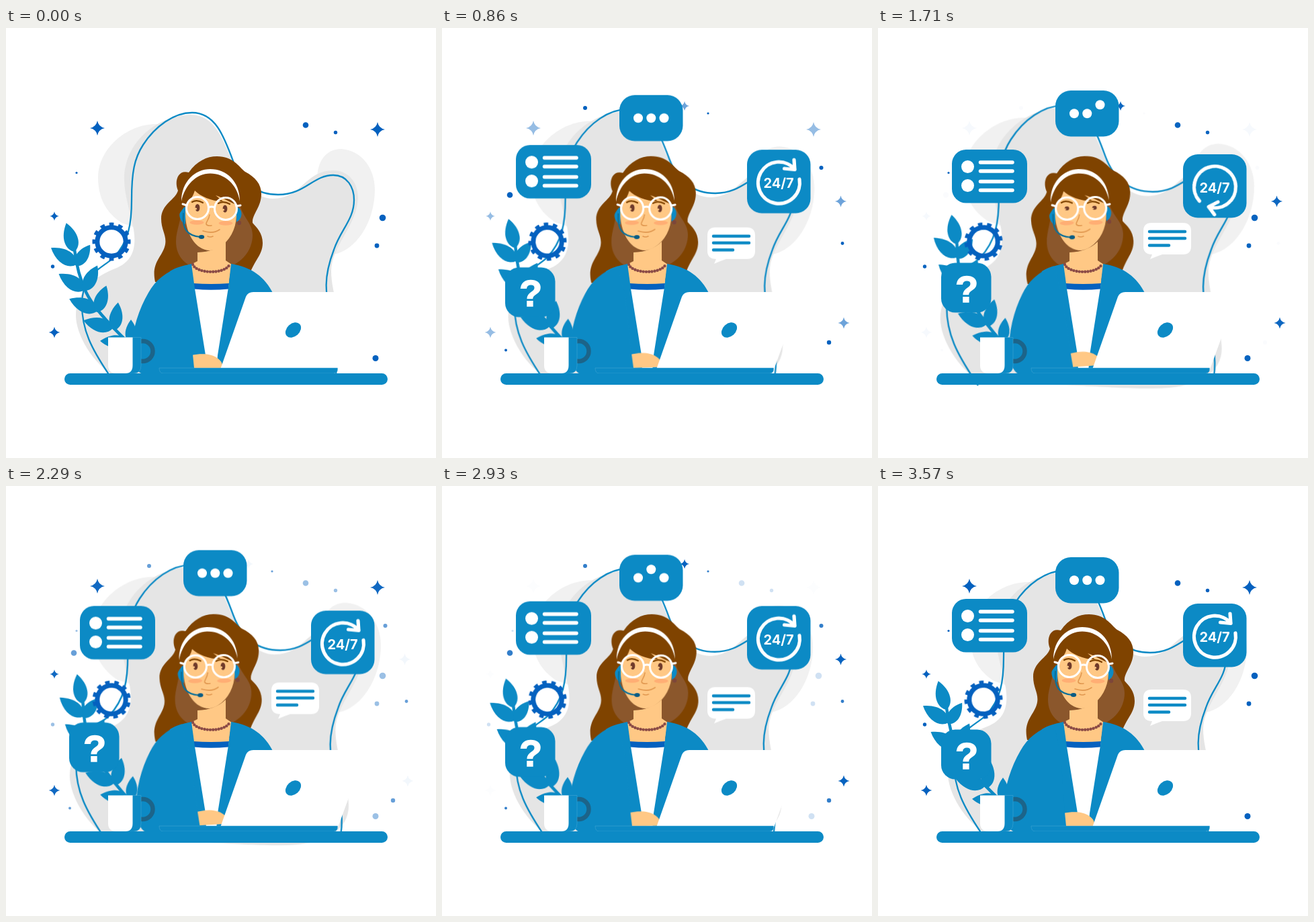
An HTML page without scripts for the animation above (3.64 s loop, 640 by 640 pixels).

```html
<!DOCTYPE html>
<html lang="en">
<head>
<meta charset="utf-8">
<title>Support agent</title>
<style>
html, body { margin: 0; width: 100%; height: 100%; overflow: hidden; background: #fff; }
svg { display: block; width: 100vw; height: 100vh; }
:root { --blue: #0c8ac5; --navy: #0461bf; --hair: #7f4300; --skin: #ffc885; --wave: cubic-bezier(.37, 0, .63, 1); }

.sway, .pop, .star, .dot, .hop, .spin, .wobble, .blink { animation: 3640ms var(--wave) infinite; }
.sway { animation-name: sway; }
.down { --to: translateY(13px); }
.up { --to: translateY(-13px); }
.scene { --to: scale(1.05); transform-origin: 330px 335px; }
.head { --to: rotate(-2.3deg); transform-origin: 302px 362px; }
.arm { --to: rotate(-4deg); transform-origin: 250px 360px; }
.plant { --to: translateY(-3px) rotate(6.3deg); transform-origin: 184px 466px; }
@keyframes sway { 0%, 98.1%, 100% { transform: none } 48.7% { transform: var(--to) } }

.star { animation-name: star; }
.dot { animation-name: dot; }
.star.late { animation-name: star-late; }
.dot.late { animation-name: dot-late; }
@keyframes star { 0%, 32.7%, 65.4%, 98.1%, 100% { opacity: 1 } 16.3%, 49%, 81.7% { opacity: 0 } }
@keyframes star-late { 0%, 32.7%, 65.4%, 98.1%, 100% { opacity: 0 } 16.3%, 49%, 81.7% { opacity: 1 } }
@keyframes dot { 0%, 49%, 98.1%, 100% { opacity: 1 } 24.5%, 73.6% { opacity: 0 } }
@keyframes dot-late { 0%, 49%, 98.1%, 100% { opacity: 0 } 24.5%, 73.6% { opacity: 1 } }

/* speech bubbles grow from one corner, one after another */
.chat { animation-name: pop-chat; transform-origin: 400px 357px; }
.clock { animation-name: pop-clock; transform-origin: 454px 270px; }
.list { animation-name: pop-list; transform-origin: 222px 247px; }
.typing { animation-name: pop-typing; transform-origin: 311px 175px; }
.ask { animation-name: pop-ask; transform-origin: 168px 363px; }
@keyframes pop-chat { 0%, 1.5% { transform: scale(0) } 14%, 100% { transform: none } }
@keyframes pop-clock { 0%, 4% { transform: scale(0) } 17.7%, 100% { transform: none } }
@keyframes pop-list { 0%, 5.8% { transform: scale(0) } 19.5%, 100% { transform: none } }
@keyframes pop-typing { 0%, 6.2% { transform: scale(0) } 19.9%, 100% { transform: none } }
@keyframes pop-ask { 0%, 7.4% { transform: scale(0) } 21.1%, 100% { transform: none } }

.hop { animation-name: hop; }
.hop:nth-of-type(2) { animation-delay: 280ms; }
.hop:nth-of-type(3) { animation-delay: 560ms; }
@keyframes hop { 0%, 27%, 36.2%, 68.7%, 78%, 100% { transform: none } 31.6%, 73.4% { transform: translateY(-13px) } }

.arrow { animation-name: arrow; transform-origin: 501.5px 224px; }
@keyframes arrow { 0%, 36.2% { transform: none } 60.6%, 100% { transform: rotate(360deg) } }
.gear { animation-name: turn; animation-timing-function: linear; transform-origin: 157px 318px; }
@keyframes turn { to { transform: rotate(360deg) } }
.wobble { animation-name: wobble; transform-origin: 132px 400px; }
@keyframes wobble { 0%, 28%, 43%, 100% { transform: none } 33.2% { transform: rotate(8deg) } 38% { transform: rotate(-8deg) } }
.blink { animation-name: blink; transform-origin: 305px 268px; }
@keyframes blink { 0%, 45.5%, 51.5%, 100% { transform: none } 48.5% { transform: scaleY(.1) } }

.line { fill: none; stroke-linecap: round; stroke-linejoin: round; }
text { fill: #fff; text-anchor: middle; }
</style>
</head>
<body>
<svg viewBox="0 0 640 640">
<defs>
  <path id="star" d="M0-11Q1.8-1.8 11 0Q1.8 1.8 0 11Q-1.8 1.8-11 0Q-1.8-1.8 0-11Z"/>
  <path id="leaf" d="M0 0C-12-6-14-24 0-42C14-24 12-6 0 0Z"/>
</defs>

<!-- backdrop -->
<g class="sway scene">
  <g fill="#f1f1f1">
    <path d="M225 143C180 142 137 180 137 222C137 262 157 280 172 290L230 310Z"/>
    <path d="M463 225C463 200 475 180 499 180C530 182 549 210 549 240C549 290 520 332 487 337L480 240Z"/>
  </g>
  <path fill="#e5e5e5" d="M165 520C128 500 104 455 104 428C104 390 135 368 165 357C190 346 194 325 190 300C185 272 176 250 176 225C176 170 225 130 275 129C312 130 322 165 338 202C352 235 375 254 397 254C440 254 445 212 487 212C510 212 524 230 524 253C522 295 484 325 484 362C484 395 503 440 503 470C503 505 470 527 405 527C340 527 300 520 165 520Z"/>
  <path class="line" stroke="var(--blue)" stroke-width="2.3" d="M157 522L152 514C128 478 113 450 113 412C113 365 140 360 160 342C183 318 187 290 187 255C187 215 191 194 204 174C222 146 250 126 277 126C311 126 324 160 338 198C350 230 372 248 405 248C445 248 457 219 487 219C508 219 518 237 518 256C518 285 498 300 488 330C472 372 475 395 484 430C491 465 497 490 490 520"/>
</g>

<!-- sparkles -->
<g fill="var(--navy)">
  <g class="star">
    <use href="#star" x="136" y="149"/>
    <use href="#star" x="553" y="151"/>
    <use href="#star" transform="translate(72 280) scale(.62)"/>
    <use href="#star" transform="translate(72 453) scale(.76)"/>
  </g>
  <g class="star late">
    <use href="#star" transform="translate(361 116) scale(.64)"/>
    <use href="#star" transform="translate(593.5 258) scale(.78)"/>
    <use href="#star" transform="translate(598 439) scale(.78)"/>
  </g>
  <g class="dot">
    <circle cx="446" cy="144.500" r="4.300"/><circle cx="490.500" cy="155.500" r="2.700"/>
    <circle cx="105" cy="215.500" r="1.600"/><circle cx="560.500" cy="282.500" r="4.800"/>
    <circle cx="552" cy="324" r="3.400"/><circle cx="69.500" cy="355" r="2.700"/>
    <circle cx="550" cy="491.500" r="4.500"/>
  </g>
  <g class="dot late">
    <circle cx="213" cy="119" r="3"/><circle cx="101" cy="248.500" r="4.300"/>
    <circle cx="564.500" cy="208" r="3"/><circle cx="596" cy="320.500" r="2.400"/>
    <circle cx="576" cy="468" r="3.200"/><circle cx="396" cy="127" r="1.600"/>
    <circle cx="95" cy="479.500" r="2"/>
  </g>
</g>

<!-- back hair -->
<g class="sway head">
  <path fill="var(--hair)" d="M314 191C338 191 346 206 356 214C371 222 380 232 380 247C380 267 366 277 367 290C373 297 382 305 382 320C382 340 366 348 360 376L222 378C216 350 231 342 236 326C241 310 231 302 231 284C231 262 252 256 256 242C250 228 256 210 272 215C284 198 299 191 314 191Z"/>
  <path fill="#8b572c" d="M262 262C262 285 253 300 253 318C253 342 270 354 282 356L330 356C350 350 367 332 367 308C367 290 352 282 348 262Z"/>
</g>

<!-- plant -->
<g class="sway plant" fill="var(--blue)">
  <path class="line" stroke="var(--blue)" stroke-width="4.500" d="M102 330Q106 365 119 393T184 470"/>
  <use href="#leaf" transform="translate(102 333) rotate(-16) scale(1.06)"/>
  <use href="#leaf" transform="translate(105 352) rotate(-57) scale(1.08)"/>
  <use href="#leaf" transform="translate(104 354) rotate(34) scale(.9)"/>
  <use href="#leaf" transform="translate(117 390) rotate(-58) scale(1.08)"/>
  <use href="#leaf" transform="translate(117 391) rotate(27)"/>
  <use href="#leaf" transform="translate(136 421) rotate(-67) scale(1.08)"/>
  <use href="#leaf" transform="translate(135 423) rotate(20)"/>
  <use href="#leaf" transform="translate(159 447) rotate(-75) scale(1.08)"/>
  <use href="#leaf" transform="translate(161 450) rotate(8)"/>
  <use href="#leaf" transform="translate(182 468) rotate(-87)"/>
  <use href="#leaf" transform="translate(186 470) scale(.86)"/>
</g>

<!-- body -->
<path fill="var(--skin)" d="M285 334Q312 333 327 318V346L336 352L331 384H280L275 352L285 347Z"/>
<path fill="#fff" d="M279 386H332L316 508H296Z"/>
<path fill="var(--navy)" d="M279 380Q305 382 332 380L331 388.500Q305 391 280 388.500Z"/>
<path class="line" stroke="#8b4b46" stroke-width="4.400" stroke-dasharray="0 4.200" d="M278 352C284 366 325 367 333 352"/>
<g fill="var(--blue)">
  <path d="M276 351C262 354 252 357 244 362L228 512H298L297 487L281 388Z"/>
  <path d="M335 351C366 356 385 370 398 396L345 512H313L315 487L331 386Z"/>
</g>
<g class="sway arm">
  <path fill="var(--skin)" d="M276 487C292 484 306 485 314 491C320 495 324 500 321 507H276Z"/>
  <path fill="var(--blue)" d="M262 355C238 362 222 376 212 394C198 418 188 448 187 478C187 500 193 512 206 516H281L278 486L272 400Z"/>
</g>

<!-- face -->
<g class="sway head">
  <path fill="var(--blue)" d="M267 266C256 269 255 286 267 292ZM343 266C353 269 353 284 343 289Z"/>
  <circle cx="347" cy="290" r="3.200" fill="#7d4639"/>
  <path fill="var(--skin)" d="M267 240V280C268 300 276 318 288 326C298 333 309 332 317 327C333 317 342 300 343 280V240Z"/>
  <g fill="#ffae74"><ellipse cx="284" cy="289.500" rx="10.500" ry="3.200"/><ellipse cx="327" cy="290.500" rx="10.500" ry="3.200"/></g>
  <g class="line" stroke="#e0974f" stroke-width="1.600">
    <path d="M303 278C302 286 297 289 298 292Q300 295 306 294"/>
    <path d="M293 302Q308 307 318 300M300 310Q304 312 308 310"/>
  </g>
  <path class="line" stroke="var(--hair)" stroke-width="2.200" d="M277 259Q284 255 293 260M316 261Q324 257 333 262"/>
  <g class="blink" fill="#6f3b2b">
    <ellipse cx="285" cy="267.500" rx="3.400" ry="5.500"/><ellipse cx="326" cy="269" rx="3.400" ry="5.500"/>
    <g fill="var(--skin)"><circle cx="282.500" cy="269" r="1.600"/><circle cx="323.500" cy="270.500" r="1.600"/></g>
  </g>
  <path fill="var(--hair)" d="M256 280C250 240 268 206 304 206C340 206 354 240 350 266C338 262 326 254 312 249L323 258C305 258 289 250 281 242C277 257 264 265 256 280Z"/>
  <path fill="#fff" d="M261 258C261 228 282 210 304 210C328 210 348 228 348 258C344 232 325 216.500 304 216.500C283 216.500 266 234 261 258Z"/>
  <g class="line" stroke="#fff" stroke-width="3">
    <circle cx="285" cy="268" r="16.500"/><circle cx="327" cy="269" r="16.500"/>
    <path d="M301.500 267Q306 265 310.500 267M269 264L263 262M343 265L349 264"/>
  </g>
  <path class="line" stroke="#0b6f98" stroke-width="2.200" d="M264 276C262 300 270 309 289 311"/>
  <ellipse cx="291" cy="311" rx="4.200" ry="3" fill="#0a5c84"/>
</g>

<!-- desk -->
<path fill="#fff" d="M319 508L357 400Q360 393 368 393H527Q536 393 533 401L494 508Z"/>
<ellipse rx="13" ry="9.500" fill="var(--blue)" transform="translate(427.500 449.500) rotate(-42)"/>
<path fill="var(--blue)" stroke="#4ba8d5" stroke-width=".5" d="M228 506H493.500Q494 514 488 514H234Q228 514 228 506Z"/>
<circle cx="203.500" cy="481" r="15" fill="none" stroke="#1c6489" stroke-width="6.500"/>
<path fill="var(--blue)" stroke="#4ba8d5" stroke-width=".5" d="M175 460.500H201V502Q201 514 190 514H175Z"/>
<path fill="#fff" d="M152 460.500H188.500V502Q188.500 514 178 514H164Q152 514 152 502Z"/>
<rect x="87" y="514" width="481" height="17" rx="8.500" fill="var(--blue)"/>

<!-- bubbles -->
<g class="sway up"><g class="pop chat">
  <path fill="#fff" d="M407 303H454Q466 303 466 315V338Q466 350 454 350H423Q414 353 405 357Q407 353 408 350Q395 350 395 338V315Q395 303 407 303Z"/>
  <path class="line" stroke="var(--blue)" stroke-width="4.500" d="M404 316H457M404 326H457M404 336.500H433"/>
</g></g>

<g class="sway up"><g class="pop ask">
  <rect x="94" y="362.500" width="74.500" height="74" rx="21" fill="var(--blue)"/>
  <text class="wobble" x="132" y="420.500" font-family="'Liberation Sans', Arial, sans-serif" font-weight="700" font-size="56" stroke="#fff" stroke-width="1.500">?</text>
</g></g>

<g class="sway down"><g class="pop list">
  <rect x="110" y="168" width="112" height="79.500" rx="21" fill="var(--blue)"/>
  <g fill="#fff"><circle cx="133.500" cy="193.500" r="9.500"/><circle cx="133.500" cy="221.500" r="9.500"/></g>
  <path class="line" stroke="#fff" stroke-width="5.500" d="M152.500 187H200M152.500 200H200M152.500 215.500H200M152.500 228.500H200"/>
</g></g>

<g class="sway up"><g class="pop typing">
  <rect x="264" y="106" width="94.500" height="68.500" rx="23" fill="var(--blue)"/>
  <g fill="#fff">
    <circle class="hop" cx="292" cy="140.300" r="7"/>
    <circle class="hop" cx="311.300" cy="140.300" r="7"/>
    <circle class="hop" cx="330.500" cy="140.300" r="7"/>
  </g>
</g></g>

<g class="sway down"><g class="pop clock">
  <rect x="454" y="175" width="94.500" height="94.500" rx="22" fill="var(--blue)"/>
  <path class="line spin arrow" stroke="#fff" stroke-width="5.200" d="M532 219A31 31 0 1 1 525 204M524 190L525 204.500L509.500 203"/>
  <text x="501" y="232" font-family="Inter, sans-serif" font-weight="700" font-size="20">24/7</text>
</g></g>

<g class="spin gear line" stroke="var(--navy)" style="stroke-linecap: butt">
  <circle cx="157" cy="318" r="21.200" stroke-width="7"/>
  <circle cx="157" cy="318" r="26" stroke-width="5" pathLength="24" stroke-dasharray="1" stroke-dashoffset=".5"/>
</g>
</svg>
</body>
</html>
```
